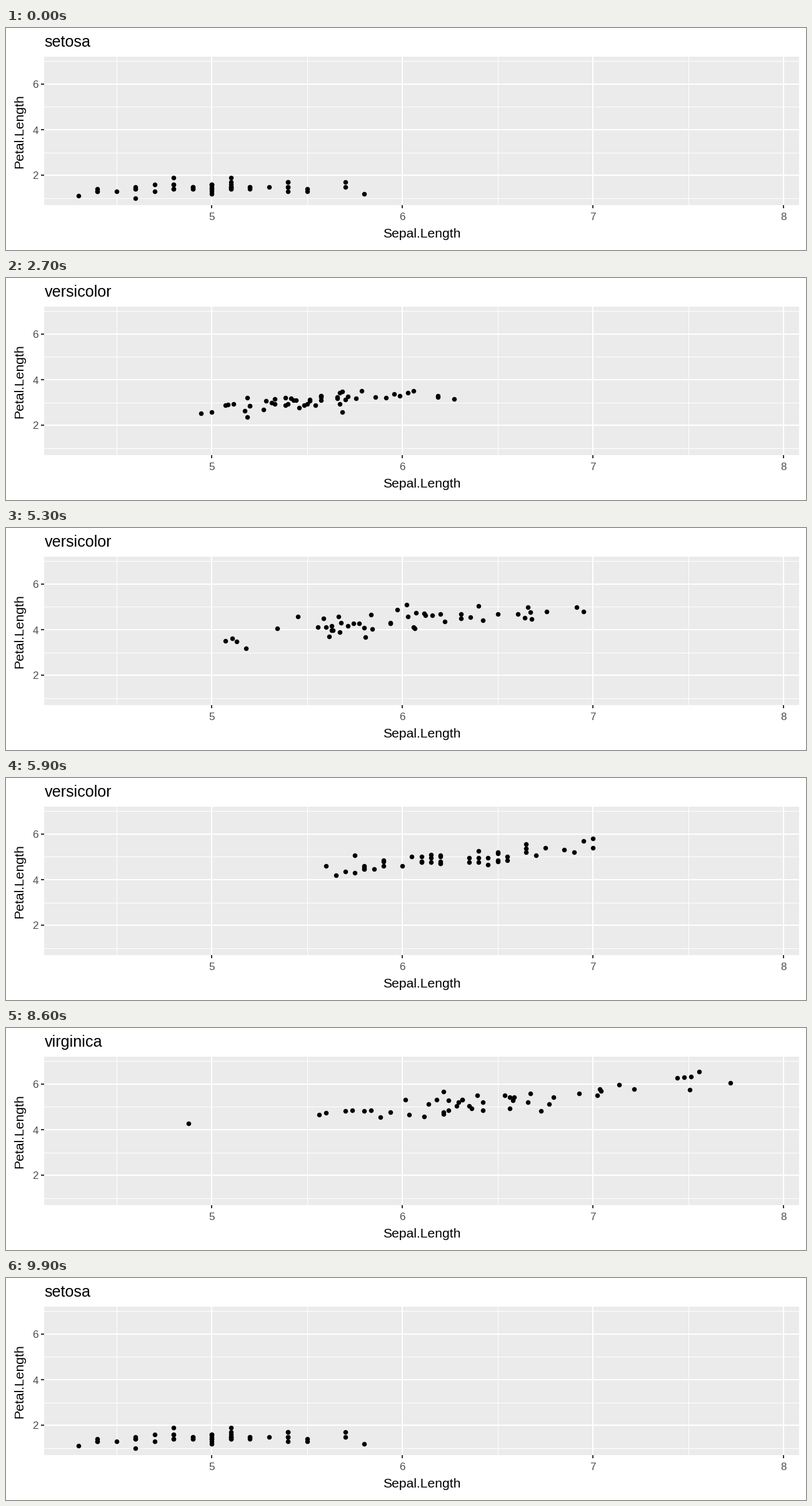
Animation, 1280 px wide and 356 px high, one loop 10 s. Source, as a matplotlib script:

```python
import numpy as np
import matplotlib.pyplot as plt
from matplotlib.animation import FuncAnimation
from matplotlib.patches import Rectangle

W, H, DPI = 1280, 356, 100
LEFT, TOP, RIGHT, BOTTOM = 61, 46, 1269, 284
HOLD, STEPS = 19, 14
PERIOD = HOLD + STEPS

plt.rcParams["font.family"] = "Liberation Sans"

# Flower measurements in millimetres, matched by row between species
setosa_sepal = [51, 49, 47, 46, 50, 54, 46, 50, 44, 49, 54, 48, 48, 43, 58, 57, 54,
                51, 57, 51, 54, 51, 46, 51, 48, 50, 50, 52, 52, 47, 48, 54, 52, 55,
                49, 50, 55, 49, 44, 51, 50, 45, 44, 50, 51, 48, 51, 46, 53, 50]
setosa_petal = [14, 14, 13, 15, 14, 17, 14, 15, 14, 15, 15, 16, 14, 11, 12, 15, 13,
                14, 17, 15, 17, 15, 10, 17, 19, 16, 16, 15, 14, 16, 16, 15, 15, 14,
                15, 12, 13, 14, 13, 15, 13, 13, 13, 16, 19, 14, 16, 14, 15, 14]
versicolor_sepal = [70, 64, 69, 55, 65, 57, 63, 49, 66, 52, 50, 59, 60, 61, 56, 67, 56,
                    58, 62, 56, 59, 61, 63, 61, 64, 66, 68, 67, 60, 57, 55, 55, 58, 60,
                    54, 60, 67, 63, 56, 55, 55, 61, 58, 50, 56, 57, 57, 62, 51, 57]
versicolor_petal = [47, 45, 49, 40, 46, 45, 47, 33, 46, 39, 35, 42, 40, 47, 36, 44, 45,
                    41, 45, 39, 48, 40, 49, 47, 43, 44, 48, 50, 45, 35, 38, 37, 39, 51,
                    45, 45, 47, 44, 41, 40, 44, 46, 40, 33, 42, 42, 42, 43, 30, 41]
virginica_sepal = [63, 58, 71, 63, 65, 76, 49, 73, 67, 72, 65, 64, 68, 57, 58, 64, 65,
                   77, 77, 60, 69, 56, 77, 63, 67, 72, 62, 61, 64, 72, 74, 79, 64, 63,
                   61, 77, 63, 64, 60, 69, 67, 69, 58, 68, 67, 67, 63, 65, 62, 59]
virginica_petal = [60, 51, 59, 56, 58, 66, 45, 63, 58, 61, 51, 53, 55, 50, 51, 53, 55,
                   67, 69, 50, 57, 49, 67, 49, 57, 60, 48, 49, 56, 58, 61, 64, 56, 51,
                   56, 61, 56, 55, 48, 54, 56, 51, 51, 59, 57, 52, 50, 52, 54, 51]


def points(sepal, petal):
    return np.column_stack([sepal, petal]) / 10


states = [("setosa", points(setosa_sepal, setosa_petal)),
          ("versicolor", points(versicolor_sepal, versicolor_petal)),
          ("virginica", points(virginica_sepal, virginica_petal))]


def px(v):
    return np.floor(61.5 + (v - 4.12) * 304.92)


def py(v):
    return np.floor(46.3 + (7.195 - v) * 36.65)


fig = plt.figure(figsize=(W / DPI, H / DPI), dpi=DPI, facecolor="white")
ax = fig.add_axes([0, 0, 1, 1])
ax.set_xlim(0, W)
ax.set_ylim(H, 0)
ax.axis("off")


def box(x0, y0, x1, y1, color):
    ax.add_patch(Rectangle((x0, y0), x1 - x0, y1 - y0, facecolor=color,
                           linewidth=0, antialiased=False))


def label(x, y, text, size, color="black", **kw):
    return ax.text(x, y, text, fontsize=size * 72 / DPI, color=color,
                   va="baseline", **kw)


box(LEFT, TOP, RIGHT, BOTTOM, "#EBEBEB")
for v in (4.5, 5.5, 6.5, 7.5):
    box(px(v), TOP, px(v) + 1, BOTTOM, "white")
for v in (1, 3, 5, 7):
    box(LEFT, py(v), RIGHT, py(v) + 1, "white")
for v in (2, 4, 6):
    y = py(v)
    box(LEFT, y - 1, RIGHT, y + 1, "white")
    box(LEFT - 5, y - 1, LEFT, y + 1, "#333333")
    label(52, y + 6.5, str(v), 17, "#4D4D4D", ha="right")
for v in (5, 6, 7, 8):
    x = px(v)
    box(x - 1, TOP, x + 1, BOTTOM, "white")
    box(x - 1, BOTTOM, x + 1, BOTTOM + 5, "#333333")
    label(x, 308, str(v), 17, "#4D4D4D", ha="center")

label(665, 336, "Sepal.Length", 21.2, ha="center")
label(27.5, 165.5, "Petal.Length", 21.2, ha="center", rotation=90,
      rotation_mode="anchor")
title = label(61.5, 30, "setosa", 25.1, ha="left")

diameter = 7.5 * 72 / DPI
dots = ax.scatter([], [], s=diameter ** 2, c="black", linewidths=0,
                  antialiased=False, zorder=3)


def draw(n):
    stage, r = divmod(n, PERIOD)
    step = max(0, r - HOLD)
    name, start = states[stage % 3]
    next_name, end = states[(stage + 1) % 3]
    pos = start + (end - start) * step / STEPS
    dots.set_offsets(np.column_stack([px(pos[:, 0]), py(pos[:, 1])]))
    title.set_text(name if step <= STEPS // 2 else next_name)
    return dots, title


anim = FuncAnimation(fig, draw, frames=100, interval=100, init_func=lambda: draw(0),
                     repeat=True, repeat_delay=0, blit=False)
plt.show()
```
